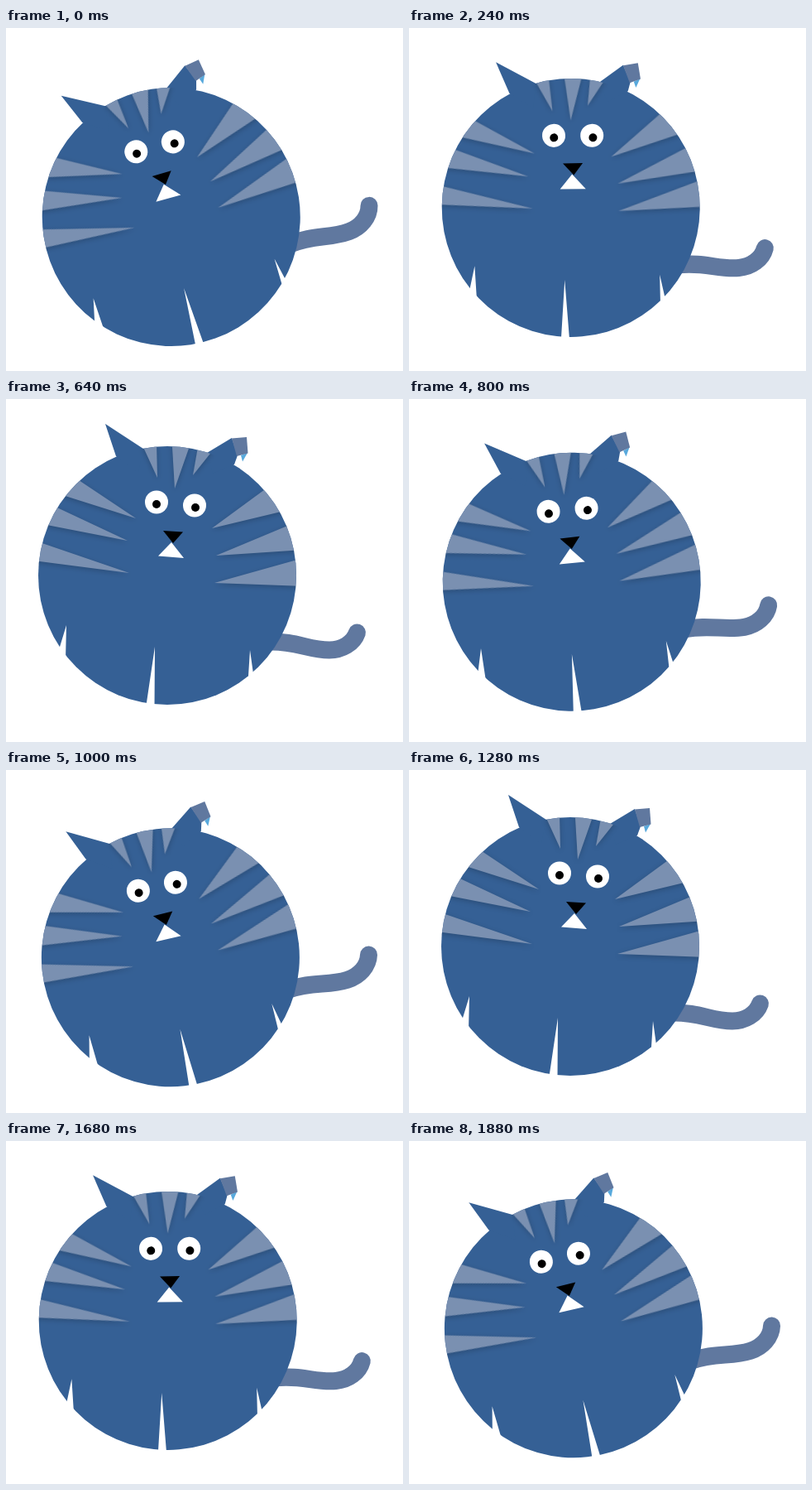
Write an HTML page that moves like this. It is 480 px wide and 414 px high and loops after 1.92 s.

```html
<!DOCTYPE html>
<html lang="en">
<head>
<meta charset="utf-8">
<title>Rocking cat</title>
<style>
  html, body { margin: 0; width: 100%; height: 100%; overflow: hidden; background: #fff; }
  svg { display: block; width: 100vw; height: 100vh; }
  .stripes { fill: #7a90b1; filter: drop-shadow(0 2px 3px #0003); }
</style>
</head>
<body>
<svg viewBox="0 0 480 414">
  <clipPath id="round"><circle cx="195" cy="213" r="156"/></clipPath>
  <g id="cat">
    <path d="M318 293C350 292 366 303 391 303C406 303 420 295 424.5 282"
      fill="none" stroke="#60789f" stroke-width="21" stroke-linecap="round"/>

    <!-- body and ears -->
    <g fill="#356095">
      <circle cx="195" cy="213" r="156"/>
      <path d="M120 30L166 60L160 90L133 69Z"/>
      <path d="M243 65L273 47L280 68L276 79L250 90Z"/>
    </g>
    <path d="M284 68L292 65L286 75.5Z" fill="#58a9dc"/>
    <path d="M273 47.5L291 46L292.5 65.5L279 69Z" fill="#60789f"/>

    <g clip-path="url(#round)">
      <g class="stripes">
        <path d="M183 95L165 56L182 53Z"/>
        <path d="M204 108L200.6 51L223 54Z"/>
        <path d="M226 92L232 58L250 62Z"/>
        <path d="M157 144L82 94L62 114Z"/>
        <path d="M147 171L51 126L39 150Z"/>
        <path d="M149 210L29 169L26 194Z"/>
        <path d="M249 156L320 104L341 134Z"/>
        <path d="M254 189L350 149L360 182Z"/>
        <path d="M252 222L363 191L362 226Z"/>
      </g>
    </g>

    <!-- gaps between the legs -->
    <path d="M73 273L62 309L72 315ZM180 299L169 373H179.5ZM295 303L292.5 342L300 339Z" fill="#fff"/>

    <!-- face -->
    <g fill="#fff">
      <circle cx="182" cy="124.5" r="14"/>
      <circle cx="228" cy="128.5" r="14"/>
      <path d="M200 173L184 189.5L215 192Z"/>
    </g>
    <circle cx="182" cy="127" r="5"/>
    <circle cx="229" cy="131" r="5"/>
    <path d="M190 159L214 160.5L202 174Z"/>
  </g>
</svg>
<script>
  const cat = document.getElementById('cat');
  const STEP = 40, HALF = 480;

  // Linear swing of 30 degrees about the stage centre, there and back.
  function draw() {
    const t = Math.floor(performance.now() / STEP) * STEP % (2 * HALF);
    const swing = 1 - Math.abs(1 - t / HALF);
    cat.setAttribute('transform', `rotate(${-20 + 30 * swing} 240 207)`);
    requestAnimationFrame(draw);
  }
  draw();
</script>
</body>
</html>
```
